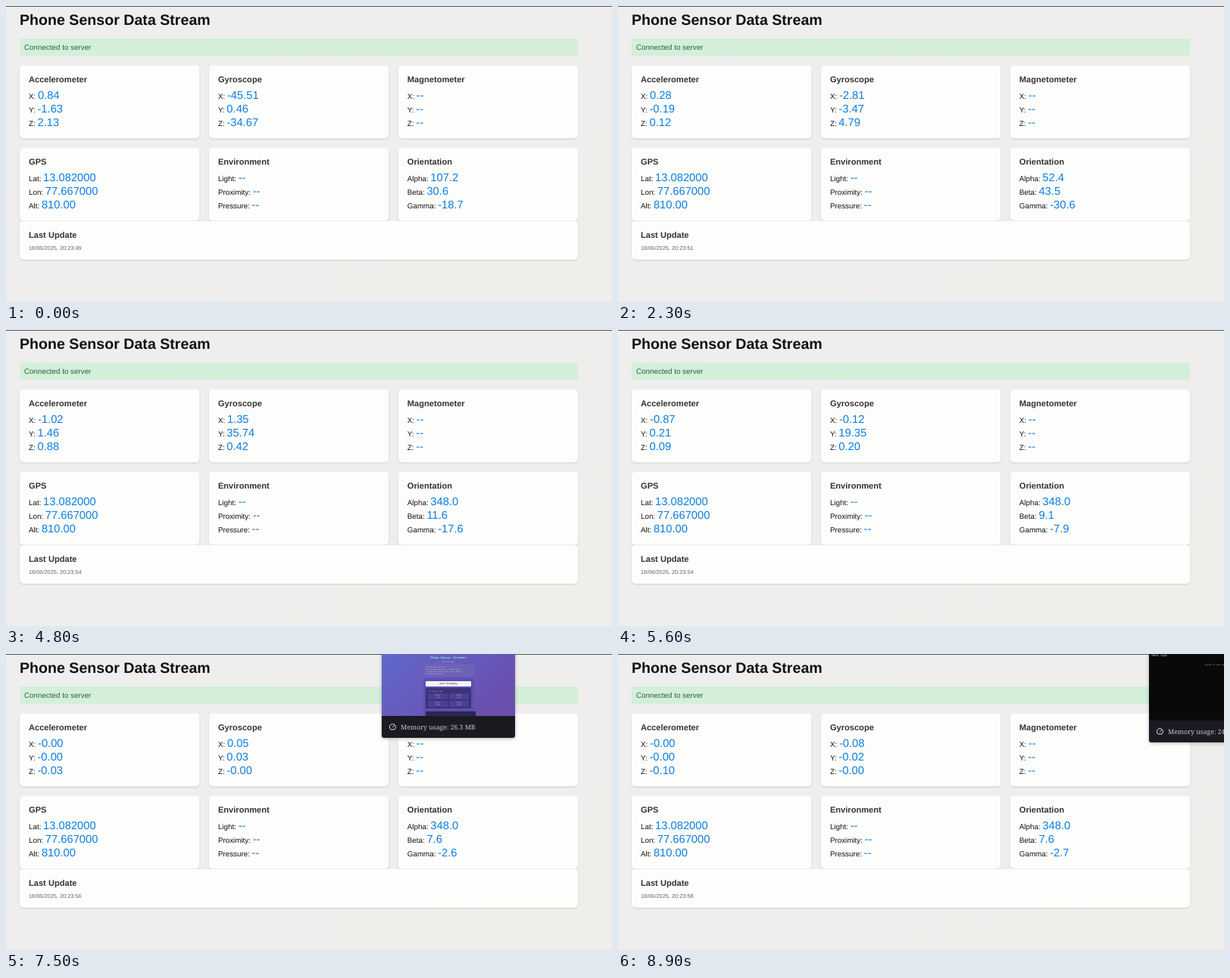
These frames come from a looping animation (800x392 px, 9100 ms). An HTML page:

```html
<!DOCTYPE html>
<html lang="en">
<head>
<meta charset="utf-8">
<title>Phone Sensor Data Stream</title>
<style>
  html, body { margin: 0; width: 100%; height: 100%; overflow: hidden; background: #efeeec; }
  svg { display: block; font: 9.82px "Liberation Sans", Arial, sans-serif; fill: #111; }
  text { text-rendering: geometricPrecision; }
  .card { fill: #fdfdfb; filter: drop-shadow(0 1px 1.3px rgba(0, 0, 0, .13)); }
  .head { font-size: 11.1px; font-weight: bold; fill: #333; }
  .value { font-size: 14.72px; fill: #0a7ee2; }
  .popup { filter: drop-shadow(0 1px 2px rgba(0, 0, 0, .3)); }
  .mono { font-family: "DejaVu Sans Mono", monospace; }
  .tiny { font-size: 2px; fill: #d9d4f0; }
  .memory { font: 8.7px "Noto Serif", serif; fill: #c9c5da; }
</style>
</head>
<body>
<svg width="800" height="392" viewBox="0 0 800 392">
  <defs>
    <linearGradient id="page" x2="1" y2="1">
      <stop stop-color="#eeeeee"/><stop offset="1" stop-color="#efeeeb"/>
    </linearGradient>
    <linearGradient id="purple" x2="1" y2=".5">
      <stop stop-color="#6168cc"/><stop offset="1" stop-color="#6b4fae"/>
    </linearGradient>
  </defs>
  <rect width="800" height="392" fill="url(#page)"/>
  <rect width="800" height="1" fill="#55555a"/>
  <text x="18" y="24.7" font-size="19.63" font-weight="bold">Phone Sensor Data Stream</text>
  <rect x="18" y="43" width="737" height="23" fill="#d4efd9"/>
  <text x="24" y="57.8" fill="#2b6040">Connected to server</text>
  <g id="cards"></g>
  <rect class="card" x="18" y="284.7" width="737" height="51.3" rx="5"/>
  <text class="head" x="30" y="307">Last Update</text>
  <text id="date" x="30" y="322.7" font-size="7.36" fill="#666"></text>
  <g id="streamer" class="popup"></g>
  <g id="logs" class="popup"></g>
</svg>
<script>
const LOOP = 9100, READING_GAP = 350;
const $ = id => document.getElementById(id);

const cards = [
  ["Accelerometer", "X", "Y", "Z"],
  ["Gyroscope", "X", "Y", "Z"],
  ["Magnetometer", "X", "Y", "Z"],
  ["GPS", "Lat", "Lon", "Alt"],
  ["Environment", "Light", "Proximity", "Pressure"],
  ["Orientation", "Alpha", "Beta", "Gamma"],
];

$("cards").innerHTML = cards.map(([title, ...labels], i) => {
  const x = 18 + (i % 3) * 249.9, y = 78.5 + (i > 2 ? 109.2 : 0);
  const rows = labels.map((label, r) =>
    `<text x="${x + 12}" y="${y + 44.7 + r * 17.8}">${label}: <tspan class="value">--</tspan></text>`);
  return `<rect class="card" x="${x}" y="${y}" width="237.4" height="96.8" rx="5"/>
    <text class="head" x="${x + 12}" y="${y + 22.4}">${title}</text>${rows.join("")}`;
}).join("");

const values = [...document.querySelectorAll(".value")];
const show = (card, texts) => texts.forEach((text, i) => values[card * 3 + i].textContent = text);
show(3, ["13.082000", "77.667000", "810.00"]);

const rect = (x, y, w, h, fill, rx = 0) =>
  `<rect x="${x}" y="${y}" width="${w}" height="${h}" fill="${fill}" rx="${rx}"/>`;
const tiny = (x, y, text, anchor = "start") =>
  `<text class="mono tiny" x="${x}" y="${y}" text-anchor="${anchor}">${text}</text>`;

// Tab preview, measured up from its bottom left corner
const preview = (x, bottom, picture, memory) => `<g transform="translate(${x} ${bottom})">
  ${rect(0, -125, 176, 125, "#1b1a21", 3)}${picture}
  <path d="M11.6-11.2a4.1 4.1 0 1 1 5.6 0zM14.4-14.2l2-2" fill="none" stroke="#e4e2ea" stroke-linecap="round"/>
  <text class="memory" x="25" y="-11">Memory usage: ${memory} MB</text></g>`;

const notice = ["⚠ Permission required", "This app needs access to motion sensors,",
  "location and device state. Allow them for", "the best experience."];
const cells = [0, 1, 2, 3].map(i => {
  const x = 61 + (i % 2) * 28, y = -59 + (i >> 1) * 10;
  return rect(x, y, 26, 8, "#4b3f93", 1) + tiny(x + 13, y + 3.4, "Sensor", "middle") +
    tiny(x + 13, y + 6.3, "0.00", "middle");
});
const streamer = rect(0, -112, 176, 83, "url(#purple)") +
  `<text class="mono" x="88" y="-104.6" font-size="3.75" font-weight="bold" fill="#8fe3d8"
    text-anchor="middle">Phone Sensor Streamer</text>` +
  tiny(88, -100.5, "Disconnected", "middle") +
  rect(55, -98, 67, 17, "#6d62b4", 1.5) +
  notice.map((line, i) => tiny(58, -93.5 + i * 3.2, line)).join("") +
  rect(55, -79, 67, 50, "#5c4fae", 1.5) +
  rect(58, -75, 60, 7, "#f4f3fa", 1) +
  `<text class="mono" x="88" y="-70.6" font-size="2.6" font-weight="bold" fill="#333"
    text-anchor="middle">Start Streaming</text>` +
  rect(58, -66, 60, 27, "#3b3279", 1.5) + tiny(61, -61, "Live Sensor Data") + cells.join("") +
  rect(58, -35, 66, 6, "#2b2750");
const logs = rect(0, -118, 176, 89, "#070a08") +
  `<text class="mono" x="3.5" y="-113.6" font-size="3.8" fill="#dedede">Data logs</text>` +
  tiny(74, -102, "Waiting for sensor data");

$("streamer").innerHTML = preview(496, 111, streamer, "26.3");
$("logs").innerHTML = preview(701, 117, logs, "24.8");

// The phone is shaken, turned, then laid to rest
const poses = [
  { at: 0, accel: [.84, -1.63, 2.13], gyro: [-45.51, .46, -34.67], turn: [107.2, 30.6, -18.7] },
  { at: 2300, accel: [.28, -.19, .12], gyro: [-2.81, -3.47, 4.79], turn: [52.4, 43.5, -30.6] },
  { at: 3700, accel: [.06, .2, -.97], gyro: [-13.17, -23.73, -1.56], turn: [37.5, 25.6, -24.6] },
  { at: 4800, accel: [-1.02, 1.46, .88], gyro: [1.35, 35.74, .42], turn: [-12, 11.6, -17.6] },
  { at: 6600, accel: [-.001, -.001, -.08], gyro: [.06, -.001, -.001], turn: [-12, 7.7, -2.5] },
  { at: 8200, accel: [-.001, -.001, -.001], gyro: [0, .16, -.001], turn: [-12, 7.6, -2.7] },
  { at: 8900, accel: [-.001, -.001, -.1], gyro: [-.08, -.02, -.001], turn: [-12, 7.6, -2.7] },
];

const random = seed => {
  const s = Math.sin(seed * 12.9898) * 43758.5453;
  return (s - Math.floor(s)) * 2 - 1;
};

function draw(now) {
  const time = Math.floor(now % LOOP / 100) * 100;
  const a = poses.findLast(pose => pose.at <= time);
  const b = poses[poses.indexOf(a) + 1] ?? { ...a, at: LOOP };
  const steps = Math.max(1, Math.round((b.at - a.at) / READING_GAP));
  const f = Math.floor((time - a.at) / (b.at - a.at) * steps) / steps;
  const eased = f * (2 - f);
  const blend = name => a[name].map((v, i) => v + (b[name][i] - v) * eased);
  // Jitter grows with the strength of the movement
  const shaken = (name, seed) => blend(name).map((v, i) => {
    const strength = (Math.abs(a[name][i]) + Math.abs(b[name][i])) / 2;
    return (f ? v + random(a.at + f * 10 + seed + i) * strength : v).toFixed(2);
  });
  const [alpha, beta, gamma] = blend("turn");

  show(0, shaken("accel", 1));
  show(1, shaken("gyro", 5));
  show(5, [(alpha + 360) % 360, beta, gamma].map(v => v.toFixed(1)));
  const readAt = a.at + f * (b.at - a.at);
  $("date").textContent = `18/06/2025, 20:23:${49 + Math.floor((readAt + 400) / 1000)}`;
  $("streamer").style.display = time >= 7200 && time < 8400 ? "" : "none";
  $("logs").style.display = time >= 8400 ? "" : "none";
  requestAnimationFrame(() => draw(performance.now()));
}
draw(0);
</script>
</body>
</html>
```
